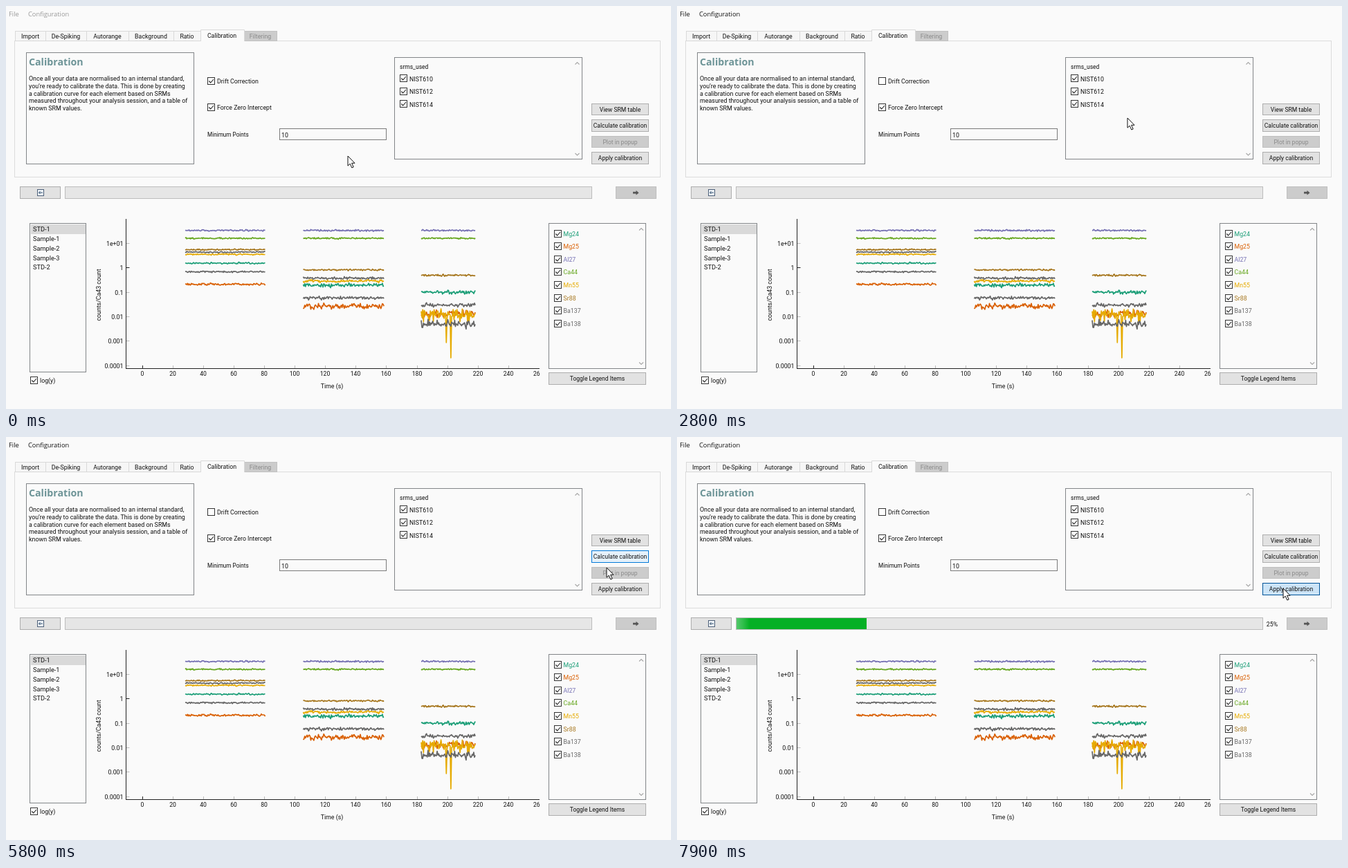
Animation of 961x583 px, one loop 8000 ms. Source, as an HTML page:

```html
<!DOCTYPE html>
<html lang="en">
<head>
<meta charset="utf-8">
<title>Calibration</title>
<style>
  html, body { margin: 0; width: 100%; height: 100%; overflow: hidden; background: #fafafa; }
  svg { display: block; width: 961px; height: 583px; }
  text { font: 8.8px Roboto, "Noto Sans", sans-serif; white-space: pre; }
</style>
</head>
<body>
<svg id="stage" viewBox="0 0 961 583"></svg>
<script>
const LOOP = 8000;
const INK = '#111', DIM = '#8a8a8a';
const stage = document.getElementById('stage');

function add(tag, attrs, parent = stage) {
  const el = document.createElementNS('http://www.w3.org/2000/svg', tag);
  for (const key in attrs) el.setAttribute(key, attrs[key]);
  parent.appendChild(el);
  return el;
}

// Crisp one-pixel box; the right and bottom edges are inclusive.
function box(x1, y1, x2, y2, fill, stroke) {
  return add('rect', { x: x1 + .5, y: y1 + .5, width: x2 - x1 - 1, height: y2 - y1 - 1, fill, stroke });
}

function path(d, stroke, width = 1, fill = 'none') {
  return add('path', { d, stroke, 'stroke-width': width, fill });
}

// Text placed by its vertical middle.
function label(str, x, middle, { size = 8.8, fill = INK, anchor = 'start', font, weight } = {}) {
  const el = add('text', { x, y: middle + size * .355, fill, 'text-anchor': anchor });
  el.style.fontSize = size + 'px';
  if (font) el.style.fontFamily = font;
  if (weight) el.style.fontWeight = weight;
  el.textContent = str;
  return el;
}

function checkbox(x, y) {
  const frame = box(x, y, x + 11, y + 11, '#fdfdfd', '#333');
  const tick = path(`M${x + 2.3} ${y + 5.5}l2.4 2.5 4.3-5`, '#222', 1.1);
  return { frame, tick };
}

function button(str, x1, y1, x2, y2, disabled) {
  const face = box(x1, y1, x2, y2, disabled ? '#ccc' : '#e2e2e2', disabled ? '#bfbfbf' : '#adadad');
  label(str, (x1 + x2) / 2, (y1 + y2) / 2 + .3, { size: 8.55, anchor: 'middle', fill: disabled ? DIM : INK });
  return face;
}

function chevron(x, y, dir) {
  path(`M${x - 3} ${y + 1.5 * dir}l3 ${-3 * dir} 3 ${3 * dir}`, '#a6a6a6', 1.1);
}

// Menu and tabs
const menu = [['File', 4], ['Configuration', 32]].map(([str, x]) =>
  label(str, x, 11.5, { size: 9.3, font: '"Open Sans", sans-serif' }));

box(12, 50, 946, 248, '#fafafa', '#dcdcdc');
[['Import', 13, 58], ['De-Spiking', 57, 117], ['Autorange', 116, 178], ['Background', 177, 243],
 ['Ratio', 242, 282], ['Filtering', 344, 392]].forEach(([str, x1, x2]) => {
  const off = str === 'Filtering';
  box(x1, 36, x2, 51, off ? '#ccc' : '#f6f6f6', off ? '#c2c2c2' : '#d9d9d9');
  label(str, (x1 + x2) / 2 - .5, 43.8, { anchor: 'middle', fill: off ? DIM : INK });
});
path('M281.5 51V34.5H344.5V51', '#d9d9d9', 1, '#fafafa');
label('Calibration', 312, 43, { anchor: 'middle' });

// Description
box(29, 67, 272, 229, '#fafafa', '#828588');
label('Calibration', 33, 81, { size: 14.2, fill: '#6d9497', weight: 700, font: '"Open Sans", sans-serif' });
['Once all your data are normalised to an internal standard,',
 'you\u2019re ready to calibrate the data. This is done by creating',
 'a calibration curve for each element based on SRMs',
 'measured throughout your analysis session, and a table of',
 'known SRM values.'].forEach((line, i) => label(line, 33, 105.3 + i * 10.6, { size: 8.9 }));

// Options
const drift = checkbox(291, 103);
label('Drift Correction', 305, 108.6);
checkbox(291, 141);
label('Force Zero Intercept', 305, 146.8);
label('Minimum Points', 291, 186.4, { size: 8.2 });
box(395, 177, 550, 194, '#fafafa', '#7a7a7a');
label('10', 398, 186.4);

box(561, 74, 833, 222, '#fafafa', '#828588');
label('srms_used', 569, 88, { size: 8.5 });
['NIST610', 'NIST612', 'NIST614'].forEach((str, i) => {
  checkbox(569, Math.round(99.4 + i * 18.5));
  label(str, 583, 105.5 + i * 18.5);
});
chevron(825.5, 83, 1);
chevron(825.5, 214.5, -1);

button('View SRM table', 846, 141, 929, 158);
const calculate = button('Calculate calibration', 846, 164, 929, 182);
button('Plot in popup', 846, 188, 929, 205, true);
const apply = button('Apply calibration', 846, 211, 929, 229);

// Progress row
button('', 20, 261, 79, 279);
box(45, 265, 55, 275, '#eef3f8', '#4d5f78');
path('M53 270H47.5M49.5 268l-2 2 2 2', '#33506f');
button('', 881, 261, 940, 279, true);
path('M906 268.8h4.5v-2l4 3.4-4 3.4v-2H906z', 'none', 0, '#555');
box(85, 261, 847, 279, '#e6e6e6', '#bcbcbc');
const glow = add('linearGradient', { id: 'glow' }, add('defs', {}));
[[0, '#55c96c'], [.05, '#30be4b'], [.1, '#06b025'], [1, '#06b025']].forEach(([offset, color]) =>
  add('stop', { offset, 'stop-color': color }, glow));
const chunk = add('rect', { x: 86, y: 262, width: 188, height: 16, fill: 'url(#glow)' });
const percent = label('', 860, 270.5, { anchor: 'middle' });

// Sample list
box(34, 314, 116, 530, '#fafafa', '#828588');
add('rect', { x: 36, y: 316, width: 79, height: 14, fill: '#d9d9d9' });
['STD-1', 'Sample-1', 'Sample-2', 'Sample-3', 'STD-2'].forEach((str, i) =>
  label(str, 39, 323.2 + i * 13.75, { size: 9.2 }));
checkbox(35, 536);
label('log(y)', 49, 541.8);

// Legend
const COLORS = {
  Mg24: '#1b9e77', Mg25: '#d95f02', Al27: '#7570b3', Ca44: '#66a61e',
  Mn55: '#e6ab02', Sr88: '#a6761d', Ba137: '#666666', Ba138: '#666666'
};
box(784, 314, 925, 525, '#fafafa', '#828588');
Object.entries(COLORS).forEach(([name, fill], i) => {
  const y = 329.5 + i * 18.6;
  checkbox(792, Math.round(y - 6));
  label(name, 805.5, y, { fill });
});
chevron(918, 323, 1);
chevron(918, 517, -1);
button('Toggle Legend Items', 784, 530, 925, 548);

// Axes
path('M173.5 308V525M173 524.5H771', '#222');
['1e+01', '1', '0.1', '0.01', '0.001', '0.0001'].forEach((str, i) => {
  const y = Math.round(343 + i * 35.3);
  label(str, 169.5, y + .5, { anchor: 'end' });
  path(`M174 ${y + .5}h4.5`, str === '1' ? '#222' : '#bbb');
});
for (let v = 0; v < 260; v += 20) {
  const x = Math.round(197 + v * 2.203);
  label(v, x, 532, { anchor: 'middle', size: 8.6 });
  path(`M${x + .5} 524v-4`, v ? '#bbb' : '#222');
}
label('26', 762, 532, { size: 8.6 });
label('Time (s)', 471, 550.2, { anchor: 'middle' });
label('counts/Ca43 count', 134, 418, { anchor: 'middle' }).setAttribute('transform', 'rotate(-90 134 418)');

// Traces: each block lists [element, level, noise]
let seed = 7;
const random = () => (seed = seed * 16807 % 2147483647) / 2147483647;
const gauss = () => random() + random() + random() - 1.5;

const BLOCKS = [
  { from: 259, to: 375.5, rows: [['Mg24', 372, 1], ['Mg25', 402.5, 1.5], ['Al27', 324.7, 1], ['Ca44', 336, 1],
    ['Mn55', 359.3, 1], ['Sr88', 352.3, 1], ['Ba137', 384.5, 1], ['Ba138', 356, 1]] },
  { from: 429.5, to: 546.5, rows: [['Mg24', 403.8, 2.6], ['Mg25', 434.5, 4], ['Al27', 324.7, 1.1], ['Ca44', 336, 1.1],
    ['Mn55', 398, 2], ['Sr88', 381.6, 1.2], ['Ba137', 422.2, 2.2], ['Ba138', 393.8, 1.6]] },
  { from: 600, to: 679, rows: [['Mg24', 413.7, 2.6], ['Mg25', 445.5, 5.5], ['Al27', 324.7, 1], ['Ca44', 336, 1],
    ['Mn55', 447, 10], ['Sr88', 389.7, 1.3], ['Ba137', 432.5, 2.8], ['Ba138', 460.5, 5.5]] }
];
const SPIKES = { 33: 487, 39: 509 };

for (const { from, to, rows } of BLOCKS) {
  for (const [name, level, noise] of rows) {
    const points = [];
    for (let i = 0, x = from; x <= to; i++, x += 1.1) {
      const spike = noise === 10 && SPIKES[i];
      points.push(`${x.toFixed(1)},${(spike || level + gauss() * noise * 1.05).toFixed(1)}`);
    }
    add('polyline', { points: points.join(' '), fill: 'none', stroke: COLORS[name], 'stroke-width': 1.7, 'stroke-linejoin': 'round' });
  }
}

const cursor = path('M0 0V14.2L3.2 11.2 5.8 17 8.2 16 5.6 10.3H10z', '#111', 1, '#fff');

// Motion tables: each row holds from its time until the next one
const MOVES = [
  [0, 494, 217], [500, 487, 212], [600, 462, 197], [700, 425, 172], [800, 385, 146], [900, 352, 125],
  [1000, 334, 114], [1100, 328, 110], [2200, 335, 112], [2300, 360, 118], [2400, 400, 126], [2500, 455, 135],
  [2600, 520, 145], [2700, 588, 154], [2800, 651, 162], [2900, 705, 166], [3000, 755, 170], [3100, 800, 174],
  [3200, 835, 177], [3300, 855, 178], [3400, 864, 178], [5800, 868, 189], [5900, 871, 198], [6000, 873, 206],
  [6100, 875, 214], [6200, 876, 219]
];
const DRIFT = [[0, 'idle'], [1000, 'hover'], [1300, 'press'], [1500, 'hover'], [2400, 'idle']];
const CALCULATE = [[0, 'idle'], [3300, 'hover'], [3600, 'press'], [4100, 'hover'], [5900, 'focus'], [6500, 'idle']];
const APPLY = [[0, 'idle'], [6100, 'hover'], [6500, 'press']];
const PROGRESS = [[0, ''], [7700, '0%'], [7900, '25%']];

const BOX_LOOK = { idle: ['#fdfdfd', '#333'], hover: ['#fdfdfd', '#0078d7'], press: ['#cce4f7', '#005499'] };
const BUTTON_LOOK = {
  idle: ['#e2e2e2', '#adadad'], focus: ['#e2e2e2', '#0078d7'],
  hover: ['#e5f1fb', '#0078d7'], press: ['#cce4f7', '#005499']
};

const at = (table, t) => table.findLast(row => row[0] <= t);

function paint(el, [fill, stroke]) {
  el.setAttribute('fill', fill);
  el.setAttribute('stroke', stroke);
}

function draw(t) {
  const [, x, y] = at(MOVES, t);
  cursor.setAttribute('transform', `translate(${x} ${y})`);
  menu.forEach(el => el.setAttribute('fill', t < 1500 ? '#999' : INK));
  paint(drift.frame, BOX_LOOK[at(DRIFT, t)[1]]);
  drift.tick.setAttribute('visibility', t < 1500 ? 'visible' : 'hidden');
  paint(calculate, BUTTON_LOOK[at(CALCULATE, t)[1]]);
  paint(apply, BUTTON_LOOK[at(APPLY, t)[1]]);
  percent.textContent = at(PROGRESS, t)[1];
  chunk.setAttribute('visibility', t < 7900 ? 'hidden' : 'visible');
}

const start = performance.now();
function tick() {
  draw((performance.now() - start) % LOOP);
  requestAnimationFrame(tick);
}
tick();
</script>
</body>
</html>
```
